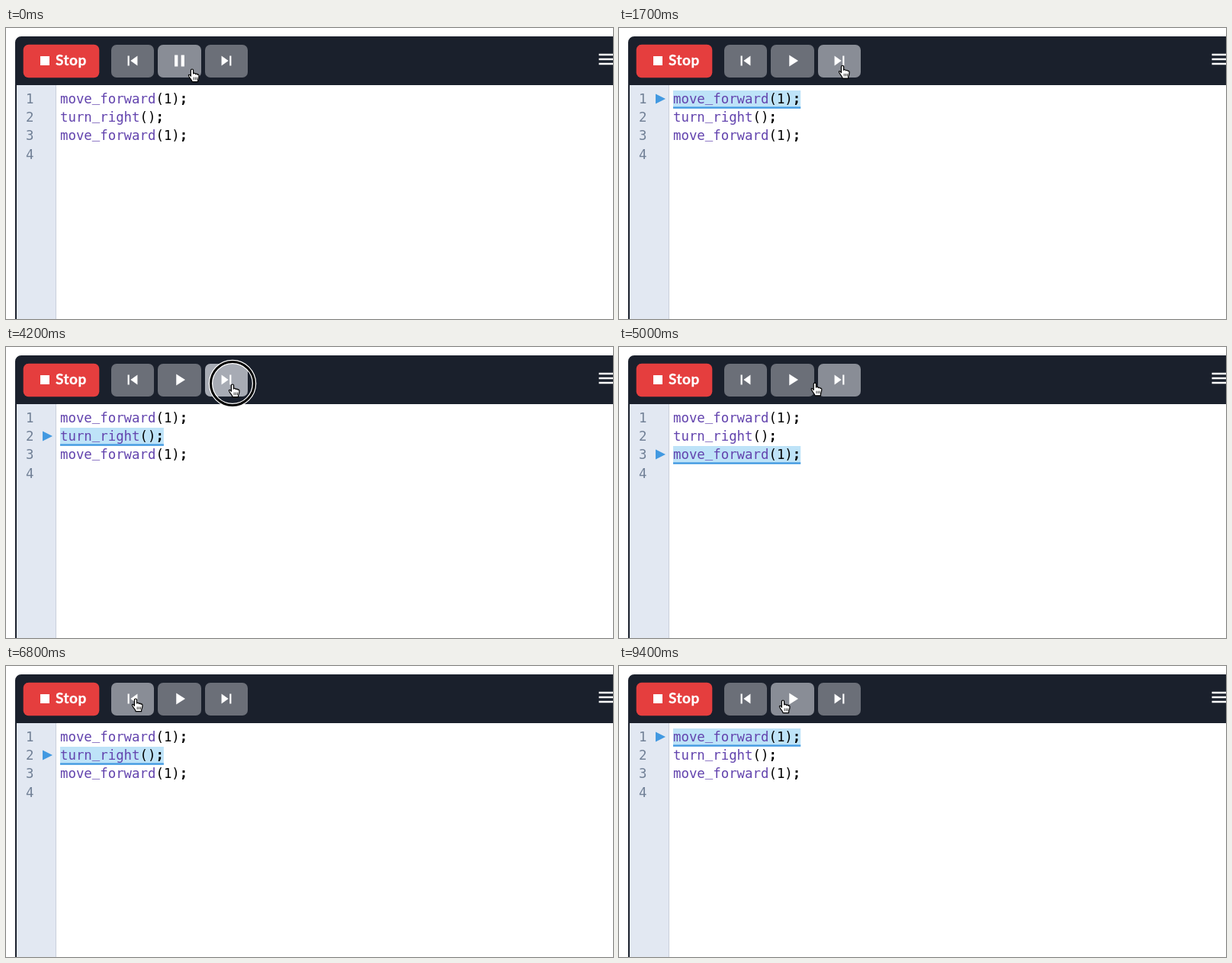
Write an HTML page that moves like this. It is 796 by 382 pixels and loops after 9500 ms.

```html
<!DOCTYPE html>
<html lang="en">
<head>
<meta charset="utf-8">
<title>Code stepper</title>
<style>
  html, body { margin: 0; width: 100%; height: 100%; overflow: hidden; background: #fff; }
  svg { display: block; width: 100vw; height: 100vh; }
  text { white-space: pre; }
  .mono { font: 17.37px "DejaVu Sans Mono", monospace; }
  .num { fill: #718096; }
  .call { fill: #6344ae; }
  .under { baseline-shift: 2px; }
  .semi { font-weight: 700; }
  .stop { font: 700 19px Lato, "Open Sans", sans-serif; letter-spacing: .5px; fill: #fff; stroke: #fff; stroke-width: .3px; }
</style>
</head>
<body>
<svg viewBox="0 0 796 382" xmlns="http://www.w3.org/2000/svg">
  <rect width="796" height="382" fill="#fff"/>
  <path d="M12 382V19a8 8 0 0 1 8-8H796V75H14V382Z" fill="#1a202c"/>
  <rect x="14" y="75" width="51" height="307" fill="#e2e8f2"/>
  <rect x="65" y="75" width="1" height="307" fill="#cbd0dc"/>

  <rect x="22.7" y="21.7" width="99.6" height="43.6" rx="7" fill="#e53e3e"/>
  <rect x="45" y="37" width="12" height="12" fill="#fff"/>
  <text class="stop" x="65" y="49">Stop</text>
  <path d="M777.5 35H796M777.5 41H796M777.5 47H796" stroke="#fff" stroke-width="2.3"/>

  <g id="buttons"></g>

  <g id="mark">
    <rect id="band" x="71" y="82" height="23.7" fill="#bee3f8"/>
    <rect id="rule" x="71" y="103.4" height="2.3" fill="#4299e1"/>
    <path d="M48 86.5L61 93L48 99.5Z" fill="#4299e1"/>
  </g>
  <g id="code" class="mono"></g>

  <g id="pointer">
    <g id="ring" fill="none">
      <circle class="ring" stroke="#fff" stroke-width="5.5"/>
      <circle class="ring" stroke="#000" stroke-width="3"/>
    </g>
    <path d="M-1.6 10.3V2.6a1.6 1.6 0 0 1 3.2 0V7C2 6.1 4.3 6 4.6 7.6C5 6.8 7 7 7.2 8.3C7.6 7.6 9 8 9 9.5C9 13 8.2 14 7.6 16V17.7H.2C0 16-1.5 14.5-3 12.3C-4.2 10.7-5 9.6-4.6 8.8C-4 7.8-2.4 8.7-1.6 10.3Z"
          fill="#fff" stroke="#000" stroke-width="1.2" stroke-linejoin="round"/>
    <path d="M2.2 11.5v3.5M4.4 11.5v3.5M6.5 11.5v3.5" stroke="#000" stroke-width=".8"/>
  </g>
</svg>
<script>
const LOOP = 9500, STEP = 100, CHAR = 10.45;
const TEXT_ROW = 24.2, MARK_ROW = 24;
const $ = id => document.getElementById(id);

const program = ["move_forward(1);", "turn_right();", "move_forward(1);", ""];

const icons = {
  prev: "M6 6h2v12H6zM9.5 12l8.5 6V6z",
  pause: "M6 19h4V5H6zM14 5v14h4V5z",
  play: "M8 5v14l11-7z",
  next: "M6 18l8.5-6L6 6zM16 6v12h2V6z"
};
const buttons = [
  { icon: "prev", x: 138, w: 56 },
  { icon: "play", x: 199, w: 57 },
  { icon: "next", x: 261, w: 56 }
];

const home = { x: 244, y: 53 };
const moves = [
  { start: 1200, end: 1800, x: 297, y: 48 },
  { start: 4700, end: 5500, x: 170, y: 42 },
  { start: 9000, end: 9400, x: 215, y: 44 }
];

// Each click moves the current program line by a number of rows
const clicks = [
  { down: 100, up: 400, by: 0 },
  { down: 2400, up: 2600, by: 1 },
  { down: 3900, up: 4300, by: 1 },
  { down: 6100, up: 6500, by: -1 },
  { down: 7800, up: 8200, by: -1 }
];

const clamp = u => Math.max(0, Math.min(1, u));
const smooth = u => u * u * (3 - 2 * u);
const mix = (a, b, u) => a + (b - a) * u;

function cursorAt(t) {
  return moves.reduce((p, m) => {
    const u = smooth(clamp((t - m.start) / (m.end - m.start)));
    return { x: mix(p.x, m.x, u), y: mix(p.y, m.y, u) };
  }, home);
}

const clickAt = t => clicks.find(c => t >= c.down && t < c.up);

// 0 idle, 1 hovered, 2 pressed
function levelAt(b, t) {
  const { x } = cursorAt(t);
  if (x < b.x || x > b.x + b.w) return 0;
  return clickAt(t) ? 2 : 1;
}

// Averaging the recent past gives a short fade between levels
function shade(b, t) {
  const level = [50, 100, 150].reduce((sum, ago) => sum + levelAt(b, t - ago), 0) / 3;
  return `rgb(${[107, 111, 120].map(c => Math.round(c + 30 * level))})`;
}

$("buttons").innerHTML = buttons.map(b => `
  <rect id="${b.icon}Box" x="${b.x}" y="22" width="${b.w}" height="43" rx="7"/>
  <path id="${b.icon}Icon" d="${icons[b.icon]}" fill="#fff"
    transform="translate(${b.x + b.w / 2} 43) scale(1.07) translate(-12 -12)"/>`).join("");

$("code").innerHTML = program.map((src, i) => {
  const y = 99 + TEXT_ROW * i;
  const [, name, args, end] = src.match(/^(\w*)([^;]*)(;?)$/);
  const call = name.replace("_", '<tspan class="under">_</tspan>');
  return `<text class="num" x="26" y="${y}">${i + 1}</text>
    <text x="71" y="${y}"><tspan class="call">${call}</tspan>${args}<tspan class="semi">${end}</tspan></text>`;
}).join("");

function drawMark(t) {
  const done = clicks.filter(c => t >= c.up + STEP);
  const paused = done.length > 0;
  $("playIcon").setAttribute("d", paused ? icons.play : icons.pause);
  $("mark").style.display = paused ? "" : "none";

  const line = done.reduce((sum, c) => sum + c.by, 0);
  const width = program[line].length * CHAR;
  $("mark").setAttribute("transform", `translate(0 ${MARK_ROW * line})`);
  $("band").setAttribute("width", width);
  $("rule").setAttribute("width", width);
}

function drawPointer(t) {
  const { x, y } = cursorAt(t);
  $("pointer").setAttribute("transform", `translate(${x} ${y})`);

  const click = clickAt(t);
  $("ring").style.display = click ? "" : "none";
  if (!click) return;
  const r = mix(8, 28.5, clamp((t - click.down + STEP) / 200));
  document.querySelectorAll(".ring").forEach(c => c.setAttribute("r", r));
}

function draw(t) {
  for (const b of buttons) $(b.icon + "Box").setAttribute("fill", shade(b, t));
  drawMark(t);
  drawPointer(t);
}

const start = performance.now();
function tick() {
  const t = (performance.now() - start) % LOOP;
  draw(Math.floor(t / STEP) * STEP);
  requestAnimationFrame(tick);
}
tick();
</script>
</body>
</html>
```
